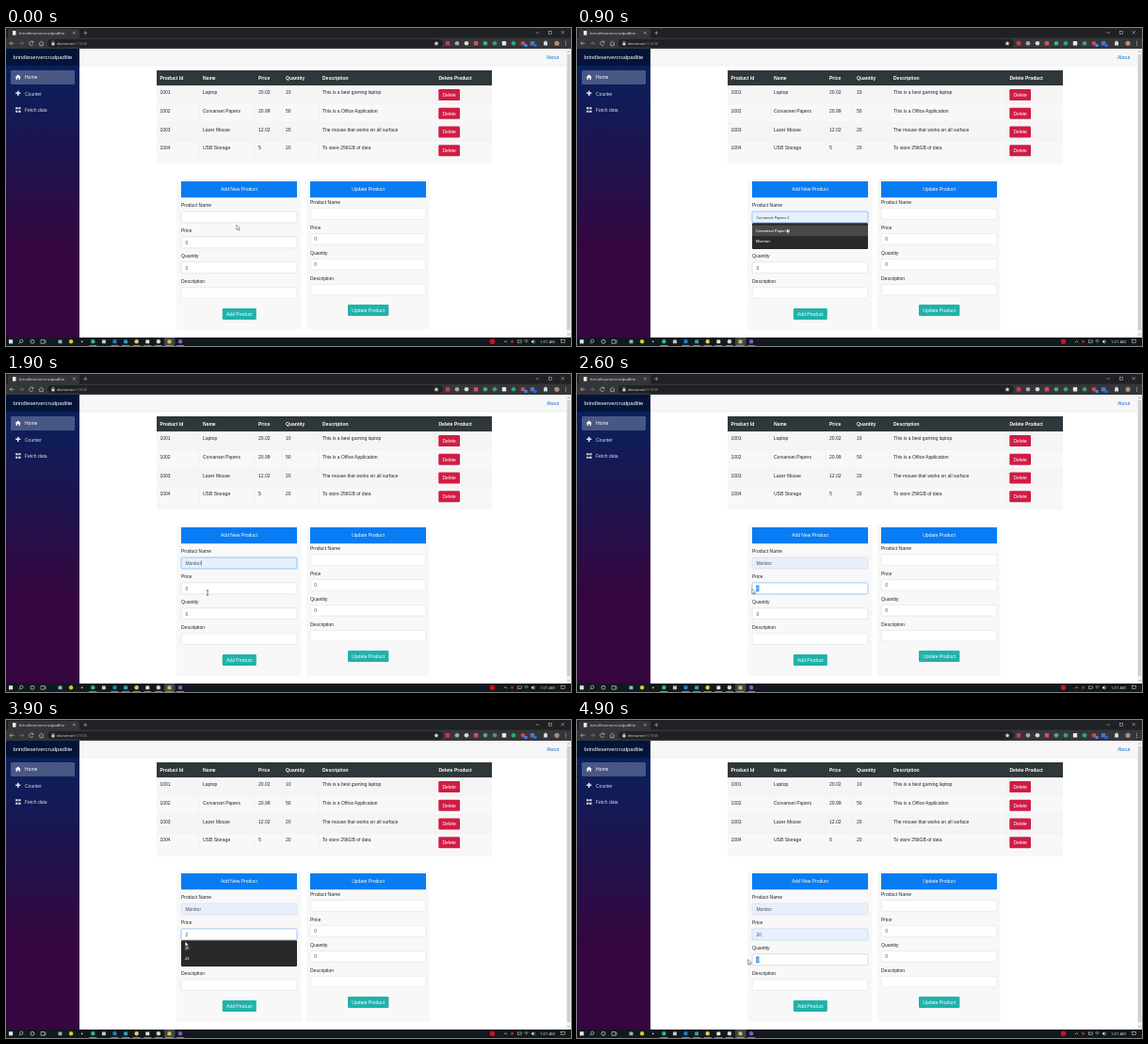
These frames come from a looping animation (600 px wide and 338 px high, 5000 ms). An HTML page:

```html
<!DOCTYPE html>
<html lang="en">
<head>
<meta charset="utf-8">
<title>Product form</title>
<style>
  html, body { margin: 0; width: 100%; height: 100%; overflow: hidden; background: #fff; }
  svg { display: block; width: 100vw; height: 100vh; }
  text { font: 5px "Liberation Sans", Arial, sans-serif; fill: #212529; white-space: pre; }
  .b { font-weight: 700; }
  .w { fill: #fff; }
  .mid { text-anchor: middle; }
  .value { fill: #495057; }
  .ui { font: 4.2px "Open Sans", sans-serif; fill: #e4e6e8; }
  .hint { font: 600 3.9px "Open Sans", sans-serif; fill: #f4f4f4; }
  .preview { font: 3.9px "Open Sans", sans-serif; fill: #222; }
</style>
</head>
<body>
<svg viewBox="0 0 600 338" preserveAspectRatio="none">
  <defs>
    <linearGradient id="side" x1="0" y1="0" x2="0" y2="1">
      <stop offset="0" stop-color="#05235f"/>
      <stop offset=".7" stop-color="#35063f"/>
    </linearGradient>
  </defs>
  <g id="page"></g>
  <g id="live"></g>
</svg>
<script>
const LOOP = 5000, STEP = 100;
const page = document.getElementById('page');
const live = document.getElementById('live');

const rect = (x, y, w, h, fill, more = '') =>
  `<rect x="${x}" y="${y}" width="${w}" height="${h}" fill="${fill}" ${more}/>`;
const dot = (x, y, r, fill) => `<circle cx="${x}" cy="${y}" r="${r}" fill="${fill}"/>`;
const line = (d, color, w = .6) =>
  `<path d="${d}" fill="none" stroke="${color}" stroke-width="${w}"/>`;
const text = (x, y, s, cls = '', more = '') =>
  `<text x="${x}" y="${y}" class="${cls}" ${more}>${s}</text>`;
const input = (x, y, fill = '#fff', stroke = '#ced4da') =>
  rect(x + .2, y + .2, 122.6, 11.6, fill, `rx="1.2" stroke="${stroke}" stroke-width=".4"`);
const button = (x, y, w, fill, label) =>
  rect(x, y, w, 12, fill, 'rx="1.2"') + text(x + w / 2, y + 7.8, label, 'w mid');

function browser() {
  const tools = ['#d8343f', '#a9a9ad', '#d9d9d9', '#d84d58', '#43b66b', '#29a38a',
    '#e8e8e8', '#35a66f', '#d94352', '#4776d2'];
  const c = '#d5d7d9';
  let s = rect(0, 0, 600, 11, '#202124') + rect(2, 1, 76, 11, '#35363a', 'rx="2"')
    + rect(0, 10.5, 600, 11.5, '#35363a') + rect(44, 12, 420, 8.6, '#202124', 'rx="4.3"')
    + rect(7, 3, 3.5, 4.6, '#eee') + text(14, 6.9, 'brindleservercrudpadlite', 'ui')
    + line('M71 3.8l2.6 2.6m0-2.6l-2.6 2.6M84.3 3.2v4m-2-2h4', c, .5)
    + line('M562.5 5h3.5M589.5 3l3.4 3.4m0-3.4l-3.4 3.4', c, .5)
    + rect(576.5, 3.2, 3, 3, 'none', `stroke="${c}" stroke-width=".5"`)
    + line('M8.5 16.3h-4.5m2-2l-2 2 2 2', c)
    + line('M14 16.3h4.5m-2-2l2 2-2 2', '#85878a')
    + line('M28.8 15.2a2.2 2.2 0 1 0 .1 2m0-3.4v1.6h-1.6', c)
    + line('M35 16.5l2.5-2.3 2.5 2.3m-4.2-.4v2.6h3.4v-2.6', c)
    + rect(48.5, 15.8, 3, 2.6, c) + line('M49 16v-1a1 1 0 0 1 2 0v1', c, .5)
    + text(54, 17.8, 'devserver<tspan fill="#8c8f93">:51846</tspan>', 'ui')
    + `<path d="M457 13.8l.8 1.7 1.8.2-1.4 1.2.4 1.9-1.6-1-1.6 1 .4-1.9-1.4-1.2 1.8-.2z" fill="${c}"/>`;
  tools.forEach((color, i) => {
    const x = 469 + i * 10;
    s += i % 3 ? dot(x, 16.3, 2.3, color) : rect(x - 2.2, 14.1, 4.4, 4.4, color, 'rx=".6"');
  });
  s += rect(550.5, 17, 3, 3, '#4285f4') + rect(560.5, 17, 3, 3, '#3565c8')
    + rect(571, 14.6, 4, 4, c, 'rx=".6"') + dot(573, 14.4, 1, c)
    + dot(585, 16.3, 2.6, '#b58b74');
  [14.5, 16.4, 18.3].forEach(y => s += dot(594.5, y, .5, c));
  return s;
}

function sidebar() {
  return rect(0, 22, 78, 307, 'url(#side)') + rect(0, 22, 78, 18, '#000', 'opacity=".4"')
    + text(7.5, 33, 'brindleservercrudpadlite', 'w', 'style="font-size:5.9px"')
    + rect(5, 45, 68, 15, '#fff', 'rx="1.3" opacity=".25"')
    + '<path d="M9.7 52.2l3.1-2.8 3.1 2.8h-.9v2.6h-1.5v-1.8h-1.4v1.8h-1.5v-2.6z" fill="#fff"/>'
    + text(20, 54, 'Home', 'w')
    + line('M12.8 66.7v5.2m-2.6-2.6h5.2', '#e7e7ee', 1.5)
    + text(20, 71.5, 'Counter', '', 'style="fill:#dcdce4"')
    + line('M10.2 85.2h2.4m.8 0h2.2M10.2 88.8h2.2m.8 0h2.4', '#e7e7ee', 2)
    + text(20, 89, 'Fetch data', '', 'style="fill:#dcdce4"');
}

function table() {
  const cols = [163.5, 209, 268, 297, 336, 459.5];
  const heads = ['Product Id', 'Name', 'Price', 'Quantity', 'Description', 'Delete Product'];
  const rows = [
    ['1001', 'Laptop', '20.02', '10', 'This is a best gaming laptop'],
    ['1002', 'Corvanset Papers', '20.99', '50', 'This is a Office Application'],
    ['1003', 'Lazer Mouse', '12.02', '20', 'The mouse that works on all surface'],
    ['1004', 'USB Storage', '5', '20', 'To store 256GB of data']];
  let s = rect(160, 45, 356, 100, '#f8f8f8') + rect(160, 45, 356, 16.3, '#30373a')
    + heads.map((h, i) => text(cols[i], 54.8, h, 'b w')).join('');
  rows.forEach((row, i) => {
    const y = 61.3 + i * 19.7;
    s += rect(160, y, 356, 19.7, i % 2 ? '#f8f8f8' : '#f5f5f5')
      + line(`M160 ${y + 19.7}h356`, '#e3e6e9', .4)
      + row.map((v, j) => text(cols[j], y + 8.9, v)).join('')
      + button(459.3, y + 3.8, 22.7, '#d01c45', 'Delete');
  });
  cols.slice(1).forEach(x => s += line(`M${x - 3.7} 61.3v78.8`, '#e9ebed', .3));
  return s;
}

function card(x, title, top, pad) {
  const labels = ['Product Name', 'Price', 'Quantity', 'Description'];
  return rect(x - pad, 161, 123 + pad * 2 - .5, 160, '#f8f8f8')
    + rect(x, 163, 123, 17.2, '#087cf2') + text(x + 61.5, 173.3, title, 'w mid')
    + labels.map((l, i) => text(x, top - 4.6 + i * 26.9, l)
      + input(x, top + i * 26.9)).join('');
}

function taskbar() {
  const icons = ['#8fb5c4', '#d5c43a', '#cfcfcf', '#2fb890', '#c5c9cc', '#1c7fd0', '#2aa6b8',
    '#f0c75a', '#e5e5e5', '#d6d6d6', '#e6b83c', '#8e55c7'];
  const c = '#dfe3e5';
  let s = rect(0, 329, 600, 9, '#10191d')
    + rect(3, 331.2, 4.2, 4.2, c)
    + line('M18 332.8a1.7 1.7 0 1 0-3.4 0 1.7 1.7 0 1 0 3.4 0m-2.9 1.3l-1.5 1.5', c)
    + '<circle cx="28" cy="333.3" r="2" fill="none" stroke="#dfe3e5" stroke-width=".7"/>'
    + line('M37 331.5h3.8v3.8h-3.8zm5 0v3.8', c)
    + rect(168, 329, 11.5, 9, '#3c474c');
  icons.forEach((color, i) => {
    const x = 57.5 + i * 11.6;
    s += i === 2 ? dot(x, 333.3, .9, color)
      : i % 2 ? dot(x, 333.3, 2.2, color)
      : rect(x - 2, 331.4, 4, 3.9, color, 'rx=".5"');
    if (i > 2 && i !== 4) s += rect(x - 4, 337.3, 8, .7, '#76b9ed');
  });
  return s + dot(516.5, 333.3, 2.8, '#c5141d')
    + line('M528.7 334.3l1.8-1.8 1.8 1.8', c) + dot(537.5, 333.3, 1.5, '#b9262c')
    + rect(543.5, 332, 4, 2.5, 'none', `stroke="${c}" stroke-width=".5"`)
    + line('M550.5 332.5q2-1.7 4 0m-3.2 1q1.2-1 2.4 0m-1.2 1v.6', c, .5)
    + `<path d="M558 332.5h1l1.4-1.2v4.2l-1.4-1.2h-1z" fill="${c}"/>`
    + line('M561.4 332q1 1.4 0 2.7', c, .4)
    + text(567, 335, '1:01 AM', 'ui')
    + rect(589.5, 331.4, 4, 3.2, 'none', `stroke="${c}" stroke-width=".5"`);
}

const LEFT = 186, TOP = 195, GAP = 26.9;
const fieldY = i => TOP + i * GAP;

page.innerHTML = rect(78, 22, 522, 307, '#fff') + browser() + sidebar()
  + rect(78, 22, 517, 18, '#f7f7f7') + line('M78 40h517', '#d9d9d9', .4)
  + text(574, 32.5, 'About', '', 'style="fill:#1270d0"')
  + rect(595, 22, 5, 307, '#f3f3f3') + rect(595.8, 28, 3.4, 293, '#cfcfcf')
  + line('M596.3 26l1.2-1.3 1.2 1.3M596.3 325l1.2 1.3 1.2-1.3', '#666', .5)
  + table()
  + card(LEFT, 'Add New Product', TOP, 5) + button(229.8, 298, 36, '#20b2aa', 'Add Product')
  + card(323, 'Update Product', 191.5, 4) + button(363, 294, 43.4, '#20b2aa', 'Update Product')
  + text(327.3, 226, '0', 'value') + text(327.3, 252.9, '0', 'value')
  + taskbar();

// Pointer path: time, x, y
const path = [
  [0, 244.8, 209.2], [100, 242, 207.8], [200, 233, 202.5], [400, 231, 201.7], [700, 231, 201.7],
  [1100, 214.4, 224.2], [1500, 214.4, 224.2], [1900, 214, 232.5], [2000, 214, 232],
  [2300, 197, 228.5], [2400, 197, 228.5], [2700, 182, 228.3], [3600, 182, 228.3],
  [4200, 198.5, 242.6], [4500, 198.5, 242.6], [4700, 196, 254.5], [4900, 181.5, 254.5]];

function pointerAt(t) {
  const i = path.findIndex(p => p[0] > t);
  if (i < 0) return path[path.length - 1].slice(1);
  const [a, b] = [path[i - 1], path[i]];
  let k = (t - a[0]) / (b[0] - a[0]);
  k = k * k * (3 - 2 * k);
  return [a[1] + (b[1] - a[1]) * k, a[2] + (b[2] - a[2]) * k];
}

function field(i, f) {
  const y = fieldY(i);
  let s = '';
  if (f.focus) s += rect(LEFT - .5, y - .5, 124, 13, '#007bff', `rx="1.6" opacity="${.25 * f.focus}"`);
  s += input(LEFT, y, f.filled ? '#e8f0fe' : '#fff', f.focus === 1 ? '#6db1ff' : '#ced4da');
  if (f.selected) s += rect(190.2, y + 2.7, 3.2, 6.6, '#2f86e8');
  s += text(190.4, y + 7.8, f.value, f.preview ? 'preview' : 'value',
    f.selected ? 'style="fill:#fff"' : '');
  if (f.caret !== undefined) s += rect(f.caret, y + 3, .4, 6, '#222');
  return s;
}

function menu(i, items, x, y) {
  const top = fieldY(i) + 12.3;
  const hover = x > LEFT && y > top + 2 ? (y < top + 13.8 ? 0 : 1) : -1;
  let s = rect(LEFT, top, 123, 27.8, '#29292b', 'rx="1"');
  if (hover >= 0) s += rect(LEFT, top + 2.5 + hover * 11.4, 123, 11.4, '#49494b');
  return [s + items.map((v, j) => text(190, top + 9.8 + j * 11.3, v, 'hint')).join(''), hover];
}

function pointer(x, y, beam) {
  if (beam) return line(`M${x - 1.2} ${y - 2.6}h2.4m-1.2 0v5.2m-1.2 0h2.4`, '#222', .55);
  return `<path d="M${x} ${y}v5.2l1.2-1.1.9 2 .9-.4-.9-1.9h1.7z" fill="#fff" stroke="#222" stroke-width=".4"/>`;
}

function draw(t) {
  const [x, y] = pointerAt(t);
  const blink = since => (t - since) % 1000 < 500;
  const name = { value: '' }, price = { value: '0' }, amount = { value: '0' };
  let list = '', hover = -1;

  if (t >= 200 && t < 1500) {
    name.focus = 1;
    if (t >= 300) [list, hover] = menu(0, ['Corvanset Papers 2', 'Monitor'], x, y);
    if (hover >= 0) {
      Object.assign(name, { value: hover ? 'Monitor' : 'Corvanset Papers 2', preview: true, filled: true });
    }
    if (blink(200)) name.caret = 190.3;
  } else if (t >= 1500) {
    Object.assign(name, { value: 'Monitor', filled: true });
    if (t < 2400) {
      name.focus = 1;
      if (blink(1500)) name.caret = 207.4;
    }
  }

  if (t >= 2400 && t < 4800) price.focus = 1;
  if (t >= 2500 && t < 3400) price.selected = true;
  if (t >= 3400 && t < 4500) {
    price.value = '2';
    [list, hover] = menu(1, ['20', '23'], x, y);
    if (hover >= 0) Object.assign(price, { value: hover ? '23' : '20', preview: true, filled: true });
    if (blink(3400)) price.caret = 193.5;
  } else if (t >= 4500) {
    Object.assign(price, { value: '20', filled: true });
    if (t < 4800) price.caret = 196.2;
  }

  if (t >= 4800) {
    price.focus = amount.focus = .4;
    amount.selected = t >= 4900;
  }

  const overField = x > LEFT && [0, 1, 2, 3].some(i => y >= fieldY(i) - .5 && y <= fieldY(i) + 12);
  live.innerHTML = field(0, name) + field(1, price) + field(2, amount) + list
    + pointer(x, y, overField && hover < 0);
}

const start = performance.now();
let last = -1;
function tick() {
  const t = Math.floor((performance.now() - start) % LOOP / STEP) * STEP;
  if (t !== last) draw(last = t);
  requestAnimationFrame(tick);
}
tick();
</script>
</body>
</html>
```
